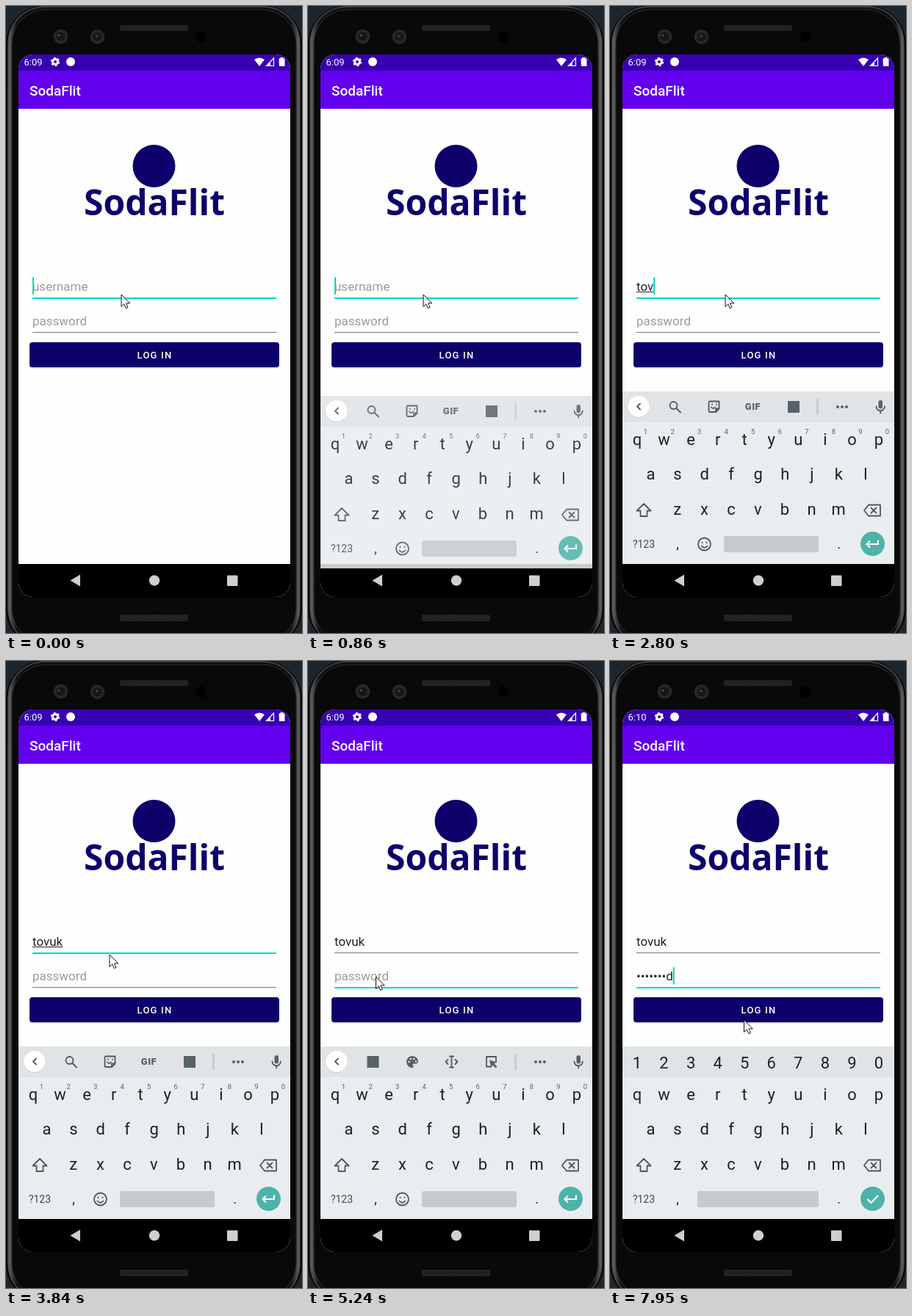
These frames come from a looping animation (403x854 px, 8000 ms). An HTML page:

```html
<!DOCTYPE html>
<html lang="en">
<head>
<meta charset="utf-8">
<title>Login screen</title>
<style>
  html, body { margin: 0; width: 100%; height: 100%; overflow: hidden; background: #1d252d; }
  svg { display: block; width: 403px; height: 854px; font-family: Roboto, sans-serif; }
  .mid { text-anchor: middle; }
  .field { font-size: 17px; }
  .key { font-size: 22px; fill: #13242c; text-anchor: middle; }
  .sup { font-size: 9.5px; fill: #56636a; text-anchor: middle; }
  .line { fill: none; stroke: #4c5960; stroke-width: 1.8; stroke-linejoin: round; stroke-linecap: round; }
  .solid { fill: #566168; }
</style>
</head>
<body>
<svg viewBox="0 0 403 854">
  <defs>
    <linearGradient id="rim" x2="1" y2="0">
      <stop offset="0" stop-color="#686868"/><stop offset=".03" stop-color="#111"/>
      <stop offset=".97" stop-color="#111"/><stop offset="1" stop-color="#686868"/>
    </linearGradient>
    <clipPath id="screen"><rect x="17" y="66" width="370" height="739" rx="20"/></clipPath>
    <pattern id="mesh" width="4" height="4" patternUnits="userSpaceOnUse">
      <path d="M0 0h4v4h-4z" fill="#292929"/><path d="M0 0l4 4M4 0l-4 4" stroke="#1b1b1b"/>
    </pattern>
  </defs>

  <!-- phone body -->
  <rect x="1.5" y=".5" width="400" height="872" rx="52" fill="#050505" stroke="#050505" stroke-width="3"/>
  <rect x="3" y="1" width="397" height="870" rx="50" fill="url(#rim)" stroke="#4a4a4a" stroke-width="1.5"/>
  <rect x="8" y="5" width="387" height="862" rx="46" fill="#090909" stroke="#2b2b2b"/>
  <rect x="155" y="26" width="93" height="8" rx="2" fill="url(#mesh)"/>
  <rect x="155" y="829" width="93" height="9" rx="2" fill="url(#mesh)"/>
  <g fill="#25272a"><circle cx="74.500" cy="41.500" r="10"/><circle cx="124.500" cy="42" r="10"/></g>
  <g fill="#15181b"><circle cx="74.500" cy="41.500" r="6"/><circle cx="124.500" cy="42" r="6"/></g>
  <g fill="#4a4f54"><circle cx="72" cy="40" r="1.500"/><circle cx="124" cy="41" r="1.500"/></g>
  <circle cx="266" cy="42" r="7.500" fill="#000"/>

  <g clip-path="url(#screen)">
    <path d="M17 66h370v739h-370z" fill="#fefefe"/>
    <path d="M17 66h370v22h-370z" fill="#3700b3"/>
    <path d="M17 88h370v52h-370z" fill="#6200ee"/>
    <path d="M17 760h370v45h-370z" fill="#000"/>

    <!-- status and app bars -->
    <g fill="#fff">
      <text id="clock" x="24.500" y="81" font-size="13"></text>
      <circle cx="67" cy="76" r="3.500" fill="none" stroke="#fff" stroke-width="3"/>
      <circle cx="67" cy="76" r="5.200" fill="none" stroke="#fff" stroke-width="2" stroke-dasharray="2.700 2.745"/>
      <circle cx="88" cy="76" r="6"/>
      <path d="M338 73q7-5 14 0l-7 9zM371.500 71.500h2v-1.500h4v1.500h2v10.500h-7.500z"/>
      <path d="M364.500 71v10.500h-10z" fill="none" stroke="#fff" stroke-width="1.200"/>
      <path d="M360 76v6h-6z"/>
      <text x="32" y="121.500" font-size="19" font-weight="500">SodaFlit</text>
    </g>

    <!-- login form -->
    <g fill="#0d006b">
      <circle cx="201.500" cy="218" r="29"/>
      <text class="mid" x="202" y="285" font-size="48" font-weight="700" font-family="'Open Sans', sans-serif">SodaFlit</text>
    </g>
    <text id="user" class="field" x="36" y="388"></text>
    <rect id="compose" x="36" y="389" height="1" fill="#222"/>
    <rect id="userLine" x="36" width="332"/>
    <text id="pass" class="field" x="36" y="435"></text>
    <rect id="passLine" x="36" width="332"/>
    <rect id="caret" width="2" height="23.500" fill="#03dac5"/>
    <rect x="32" y="459.500" width="340" height="34" rx="4" fill="#bbb" opacity=".7"/>
    <rect x="32" y="458" width="340" height="34" rx="4" fill="#0d006b"/>
    <text class="mid" x="202.500" y="480" font-size="13" font-weight="500" letter-spacing="1.200" fill="#fff">LOG IN</text>

    <g fill="#cfcfcf">
      <path d="M87.500 782.500l13.500-8v16z"/><circle cx="202" cy="782.500" r="7.200"/>
      <rect x="301" y="775.500" width="14.500" height="14.500" rx="1"/>
    </g>

    <!-- keyboard -->
    <g id="board">
      <path d="M17 525h370v235h-370z" fill="#e9edf0"/>
      <path d="M17 525h370v42h-370z" fill="#e0e4e7"/>
      <g id="letters"></g>
      <path class="line" d="M46 678l9.500 9.500h-5v7.500h-9v-7.500h-5z"/>
      <path class="line" d="M352 679.500h16v15h-16l-6-7.500zM355.500 683.500l7 7M362.500 683.500l-7 7"/>
      <text class="mid" x="46" y="738" font-size="14" fill="#3d4a51">?123</text>
      <text class="key" x="92" y="739" style="font-size:18px">,</text>
      <text class="key" x="311.500" y="739" style="font-size:18px">.</text>
      <rect id="space" y="722" height="22" rx="3" fill="#c6cacd"/>
      <circle cx="357.500" cy="732.500" r="16.500" fill="#4db3a9"/>

      <g id="plain">
        <g id="sups"></g>
        <circle cx="39" cy="546.500" r="14.500" fill="#c9cdd0"/>
        <circle cx="39" cy="545.500" r="14.500" fill="#fff"/>
        <path class="line" d="M41 541.500l-4 4 4 4M282.500 536v20" stroke-width="1.500"/>
        <path d="M282.500 535v22" stroke="#cdd2d5" stroke-width="2.500"/>
        <g class="solid">
          <circle cx="310" cy="546" r="2"/><circle cx="316" cy="546" r="2"/><circle cx="322" cy="546" r="2"/>
          <rect x="365.500" y="537" width="5.500" height="11.500" rx="2.750"/>
        </g>
        <path class="line" d="M362.500 545.500a5.700 5.700 0 0 0 11.400 0M368.200 551.500v3"/>
        <g id="toolsA">
          <circle class="line" cx="86.500" cy="544" r="5"/><path class="line" d="M90.500 548l5.500 5.500"/>
          <path class="line" d="M136 538.500h12.500v10l-4.500 4.500h-8q-1.500 0-1.500-1.500v-11.500q0-1.500 1.500-1.500zM148.500 548.500h-4.500v4.500M138 546.500q2.500 3 5 0M139 542.500v.3M145 542.500v.3" stroke-width="1.500"/>
          <text class="mid solid" x="194.500" y="550" font-size="13" font-weight="900" letter-spacing=".5">GIF</text>
          <rect class="solid" x="242" y="538" width="16" height="16"/>
        </g>
        <g id="toolsB">
          <rect class="solid" x="80.500" y="538" width="16" height="16"/>
          <path class="solid" d="M142 538a8 8 0 0 0 0 16q2.500-.5 1-3t1.500-2.500h2.500q3-.5 3-3.500a8 7.500 0 0 0-8-7z"/>
          <g fill="#e0e4e7"><circle cx="137.500" cy="546" r="1.300"/><circle cx="140" cy="542" r="1.300"/><circle cx="144.300" cy="542" r="1.300"/><circle cx="147" cy="545.500" r="1.300"/></g>
          <path class="line" d="M195.500 539v14M193 538.500h5M193 553.500h5M190.500 543l-3 3 3 3M200.500 543l3 3-3 3" stroke-width="1.600"/>
          <path class="line" d="M249 552.500h-6v-13.500h13v7"/><path class="solid" d="M247 543.500l10 3-3.500 2 4 4-2 2-4-4-2 3.500z"/>
        </g>
        <circle class="line" cx="128.500" cy="733" r="8.500"/>
        <path class="line" d="M124.500 735.500q4 4.500 8 0M125.500 730.500v.5M131.500 730.500v.5"/>
        <path d="M365 727.500v5.500h-15M354 728.500l-4.500 4.500 4.500 4.500" fill="none" stroke="#fff" stroke-width="2"/>
      </g>
      <g id="secret">
        <g id="digits"></g>
        <path d="M350.500 733l5 5 9.500-10" fill="none" stroke="#fff" stroke-width="2.200"/>
      </g>
    </g>
    <path id="mouse" d="M0 0v16.500l3.800-3.600 2.500 5.800 2.700-1.200-2.500-5.600h5.300z" fill="#fff" stroke="#111" stroke-width="1"/>
  </g>
</svg>
<script>
const $ = id => document.getElementById(id);
const set = (id, attrs) => { for (const k in attrs) $(id).setAttribute(k, attrs[k]); };
const show = (id, on) => set(id, { opacity: +on });

// Value of the last [time, value] step that has begun
const at = (steps, t) => steps.filter(s => s[0] <= t).pop()[1];

const row = (id, chars, x, y, cls) => {
  $(id).innerHTML += [...chars].map((c, i) =>
    `<text class="${cls}" x="${x + i * 36.55}" y="${y}">${c}</text>`).join('');
};
row('letters', 'qwertyuiop', 37, 597.5, 'key');
row('letters', 'asdfghjkl', 55.5, 645, 'key');
row('letters', 'zxcvbnm', 91.8, 692.5, 'key');
row('sups', '1234567890', 48.5, 583, 'sup');
row('digits', '1234567890', 37, 554.5, 'key');

const NAME = 'tovuk', SECRET = 'password', FOCUS = 4660, SWITCH = 6240;
const nameLength = [[0, 0], [2500, 1], [2800, 3], [3080, 4], [3230, 5]];
const secretLength = [[0, 0], [6240, 2], [6380, 3], [6520, 5], [6660, 6], [6810, 7], [6960, 8]];
const blink = [[0, 1], [290, 0], [550, 1], [1290, 0], [1690, 1], [2230, 0], [2500, 1], [3690, 0],
  [4240, 1], [5240, 0], [5830, 1], [7520, 0], [7950, 1]];
const pointer = [[0, [157, 393]], [3690, [151, 396]], [3840, [141, 400]], [3980, [121, 412]],
  [4110, [103, 424]], [4240, [92.5, 430]], [7810, [150, 470]], [7950, [182.5, 489]]];
const boardRise = [[0, [0, 0]], [860, [6, .86]], [1010, [0, 1]]];
const toolSwap = [[0, 0], [4240, .5], [4510, 1]];

function field(id, value, hint) {
  $(id).textContent = value || hint;
  set(id, { fill: value ? '#222' : '#9b9b9b' });
  return value ? $(id).getComputedTextLength() : 0;
}

function underline(id, y, active) {
  set(id, { y, height: active ? 2 : 1, fill: active ? '#03dac5' : '#777' });
}

function draw(t) {
  const onPass = t >= FOCUS, hidden = t >= SWITCH;
  const n = at(secretLength, t);
  const nameWidth = field('user', NAME.slice(0, at(nameLength, t)), 'username');
  const passWidth = field('pass', n ? '•'.repeat(n - 1) + SECRET[n - 1] : '', 'password');

  set('compose', { width: onPass ? 0 : nameWidth });
  underline('userLine', 397, !onPass);
  underline('passLine', 444, onPass);
  set('caret', { x: 36 + (onPass ? passWidth : nameWidth), y: onPass ? 417 : 369.5, opacity: at(blink, t) });

  const [drop, alpha] = at(boardRise, t);
  set('board', { transform: `translate(0 ${drop})`, opacity: alpha });
  show('plain', !hidden);
  show('secret', hidden);
  set('space', hidden ? { x: 119, width: 165 } : { x: 155, width: 129 });
  const swap = at(toolSwap, t);
  set('toolsA', { opacity: 1 - swap });
  set('toolsB', { opacity: swap });

  set('mouse', { transform: `translate(${at(pointer, t)})` });
  $('clock').textContent = t < 7950 ? '6:09' : '6:10';
}

function frame() {
  draw(performance.now() % 8000);
  requestAnimationFrame(frame);
}
frame();
</script>
</body>
</html>
```
